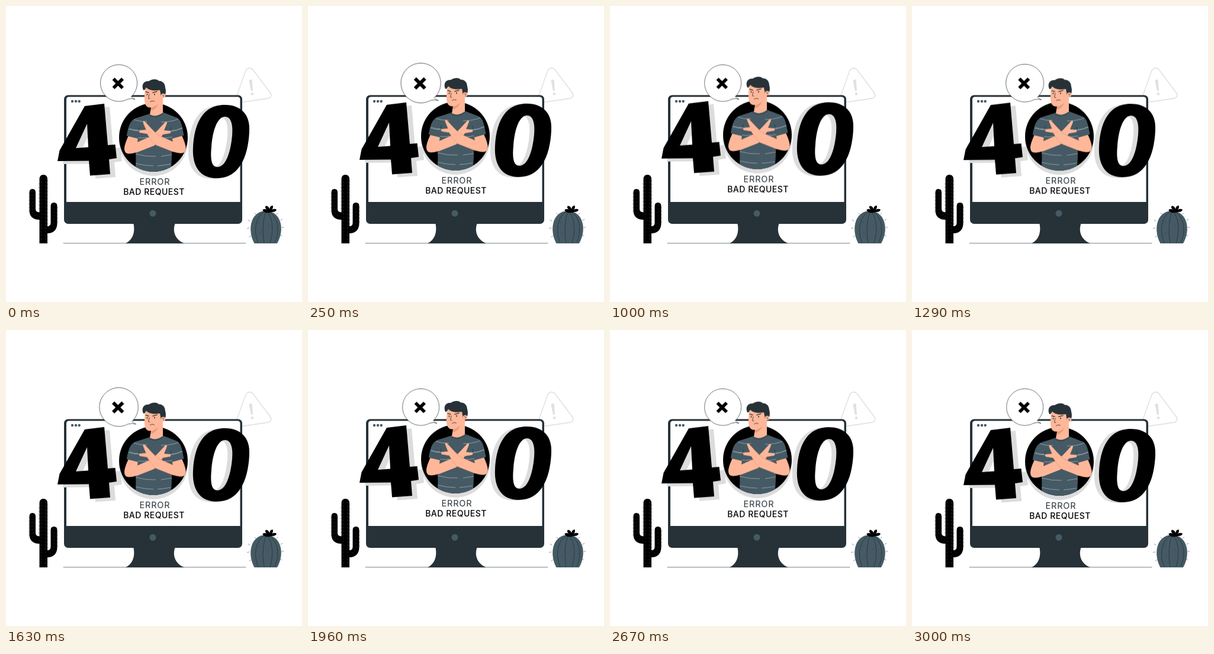
An HTML page that plays this animation: 500 by 500 pixels, repeating every 3.04 s.

```html
<!DOCTYPE html>
<html lang="en">
<head>
<meta charset="utf-8">
<title>Error 400</title>
<style>
  html, body { margin: 0; width: 100%; height: 100%; overflow: hidden; background: #fff; }
  svg { display: block; width: 100vw; height: 100vh; }
  text { font-family: Inter, "Open Sans", sans-serif; text-anchor: middle; }
  .dark { fill: #263238; }
  .slate { fill: #455a64; }
  .skin { fill: #ffb799; }
  .shade { fill: #dcdcdc; }
  .line { fill: none; stroke: #263238; stroke-linecap: round; stroke-linejoin: round; }
  .float { animation: float 3040ms linear infinite; }
  .beat { animation: beat 3040ms linear infinite; transform-origin: 190px 130.5px; }

  /* 3000 ms of motion, then a 40 ms hold */
  @keyframes float {
    0%, 49.342%, 98.684%, 100% { transform: translateY(0); }
    24.671%, 74.013% { transform: translateY(-6.5px); }
  }
  @keyframes beat {
    0%, 29.605%, 39.474%, 59.211%, 100% { transform: scale(1); }
    9.868%, 49.342% { transform: scale(1.1); }
  }
</style>
</head>
<body>
<svg viewBox="0 0 500 500">
  <defs>
    <path id="four" fill-rule="evenodd" d="M133 169 L166 165 L172 235 L184.500 234 L187 257 L174 259 L176 284 L142 286.500 L140 261.500 L87 262 L90.500 244Z M137 199 L118 240 L139 238.500Z"/>
    <path id="zero" fill-rule="evenodd" d="M362 167.500 C395 164 413 182 411 212 C409 258 392 291 356 291 C327 291 314 270 316 238 C318 201 331 171 362 167.500Z M369 187 C379 186 384 198 382 219 C379 251 370 272 357 272 C347 272 345 258 347 238 C349 210 357 188 369 187Z"/>
    <circle id="disc" cx="249" cy="222" r="58"/>
    <path id="arm" d="M207 219 C202 230 198 240 201 246 C204 252 213 249 222 247 L250 236 C256 232 262 222 265 217 L277 215 Q281 213 277 211 L267 210 L271.500 199 Q273 194 269 196 L258 208 L247 219 L222 230 L223 221Z"/>
    <clipPath id="inside">
      <rect x="180" y="100" width="140" height="122"/>
      <use href="#disc"/>
    </clipPath>
  </defs>

  <!-- warning sign -->
  <path d="M405 109 Q411 101 417.500 108 L446 146 Q451 153 443 156 L396 163 Q387 163 389 154Z" fill="#fff" stroke="#dedede" stroke-width="1.3"/>
  <path d="M410.500 125 L415.500 124 L417 143 L414 143.500Z" fill="#e0e0e0"/>
  <circle cx="416" cy="148.500" r="2.300" fill="#e0e0e0"/>

  <!-- monitor -->
  <path class="dark" d="M215 366 H286 C280 382 287 395 301 401 H202 C214 395 219 382 215 366Z"/>
  <path class="line" stroke-width=".6" d="M97 400.700 H405"/>
  <rect class="dark" x="98" y="150.500" width="301" height="217.500" rx="7"/>
  <path d="M102 331 V158 Q102 153.500 106.500 153.500 H391 Q395.500 153.500 395.500 158 V331Z" fill="#fff"/>
  <g class="slate">
    <circle cx="248" cy="350.300" r="5.500"/>
    <circle cx="112" cy="161" r="2.200"/>
    <circle cx="118" cy="161" r="2.200"/>
    <circle cx="123.700" cy="161" r="2.200"/>
  </g>

  <!-- tall cactus -->
  <path d="M56.500 401 V361 C45 361 39.500 355 39.500 345 V315 Q39.500 309 44.500 309 Q50 309 50 315 V343 Q50 348 56.500 348.500 V293 Q56.500 285 63.200 285 Q70 285 70 293 V372 Q75.500 372 75.500 366 V338 Q75.500 332 81 332 Q86.500 332 86.500 338 V367 C86.500 378 80 384 70 384 V401Z"/>
  <g class="line" stroke-width=".5" stroke-dasharray="1 5">
    <path d="M60 291 V398 M66.500 291 V398 M44.800 313 V346 Q46 354 56 355 M81 336 V367 Q79 377 70 378" stroke="#455a64"/>
    <path d="M55.500 300 V344 M71 295 V368 M38.800 316 V350 M87.200 340 V370"/>
  </g>

  <!-- round cactus -->
  <path class="slate" d="M419.500 401 C408 381 411 347 439 346 C466 347 471 379 458 401Z"/>
  <g class="line" stroke-width=".8">
    <path d="M426 400 C417 379 422 355 437 347 M436 400 C432 379 435 357 439 347 M446 400 C453 379 450 357 441 347 M454 399 C465 377 457 353 443 347"/>
    <path stroke-width=".5" d="M412 363 l-3 -1.500 M411 375 l-3.500 .5 M414 388 l-3 2 M464 362 l3 -1.500 M466 374 l3 0 M463 387 l3 1.500 M422 352 l-2 -2 M457 352 l2 -2 M428 366 l-2 -2 M443 372 l2 -2 M430 382 l-2 2 M456 378 l2 -2"/>
  </g>
  <path d="M445 349 C439 350 434 348 433.500 344 Q438 342 441 344.500 Q436 340 439 337.500 Q444 338 445 343 Q446 337 450.500 337 Q452 341 449 344 Q454 341.500 457 344 Q456 348 450 348Z"/>

  <g class="float">
    <g class="shade">
      <use href="#four" x="9" y="5"/>
      <use href="#disc" y="7"/>
      <use href="#zero" x="-8" y="1"/>
    </g>
    <use href="#four"/>
    <use href="#zero"/>
    <use href="#disc"/>

    <!-- man -->
    <g clip-path="url(#inside)">
      <path class="slate" d="M243 182 Q252 189 265 179.500 L287 188 C295 191 297 198 300 218 L281 223 L280 250 Q280 270 277 285 H218 Q220 265 219 247 L222 222 L204 219 C207 200 211 192 221 189Z"/>
      <g fill="none" stroke="#b0bec5" stroke-width=".7">
        <path d="M216 192 Q227 196 238 195 M262 196 Q278 196 291 191 M208 207 Q216 210 226 210 M276 211 Q287 211 298 206 M220 222 Q230 224 239 222 M265 223 Q274 223 281 221 M219 250 Q237 255 253 254 M262 254 L280 251 M219 266 Q235 270 249 270 M256 270 Q270 269 278 267"/>
      </g>
      <path class="line" stroke-width=".7" d="M222 222 L225 205 M281 223 L278 205 M241 184 Q252 192 267 181"/>
    </g>
    <path class="skin" d="M246 165 L243 183 Q253 189 265 180 L265 150Z"/>
    <path fill="#e99a7d" d="M245.500 172 Q254 169 258 163 Q255 174 245 177Z"/>
    <path class="skin" d="M236 134 C234 146 233 158 235 165 C237 172 244 173 250 170 C257 167 262 162 264 154 L264 136Z"/>
    <path class="dark" d="M232 142 C228 133 233 126 241 127 C248 122.500 255 123 258 126.500 C265 126 269 132 269 138 C271 144 269.500 151 267 154 L262 153 L260 142 C250 144 241 142 237 137.500 L234 142Z"/>
    <circle class="skin" cx="265.500" cy="151.500" r="3.800"/>
    <path class="line" stroke-width="1.300" d="M236 145 L241 146.500 M248 146.500 L255 144.500"/>
    <path class="line" stroke-width=".8" d="M242 149 L240.500 156 L243 156.500 M243.500 161.500 Q247 159 250.500 161 M264.500 150 Q267 150 266 153"/>
    <ellipse class="dark" cx="238.500" cy="149.500" rx=".9" ry="1.300"/>
    <ellipse class="dark" cx="251" cy="149.300" rx=".9" ry="1.300"/>
    <use class="skin" href="#arm"/>
    <g class="skin" stroke="#d98a70" stroke-width=".5">
      <use href="#arm" transform="matrix(-1 0 0 1 503.500 -1)"/>
    </g>
    <path class="slate" d="M204 219.500 L223 224 L225 212 L207 207Z M300.500 218.500 L281 224 L278 212 L298 207Z"/>
    <path fill="none" stroke="#b0bec5" stroke-width=".7" d="M207 208 Q216 211 225 211 M278 212 Q288 211 298 206"/>

    <text class="dark" x="251.500" y="302" font-size="14.500" letter-spacing=".8">ERROR</text>
    <text x="250" y="319" font-size="14" font-weight="500" letter-spacing=".5">BAD REQUEST</text>
  </g>

  <!-- speech bubble -->
  <g class="beat">
    <path d="M211.500 153 A31 31 0 1 0 205.500 157.300 Q212 155.500 218 157.500 Q213.500 156 211.500 153Z" fill="#fff" stroke="#263238" stroke-width=".7"/>
    <path d="M181.500 123 L197 138.500 M197 123 L181.500 138.500" stroke="#000" stroke-width="5.500"/>
  </g>
</svg>
</body>
</html>
```
